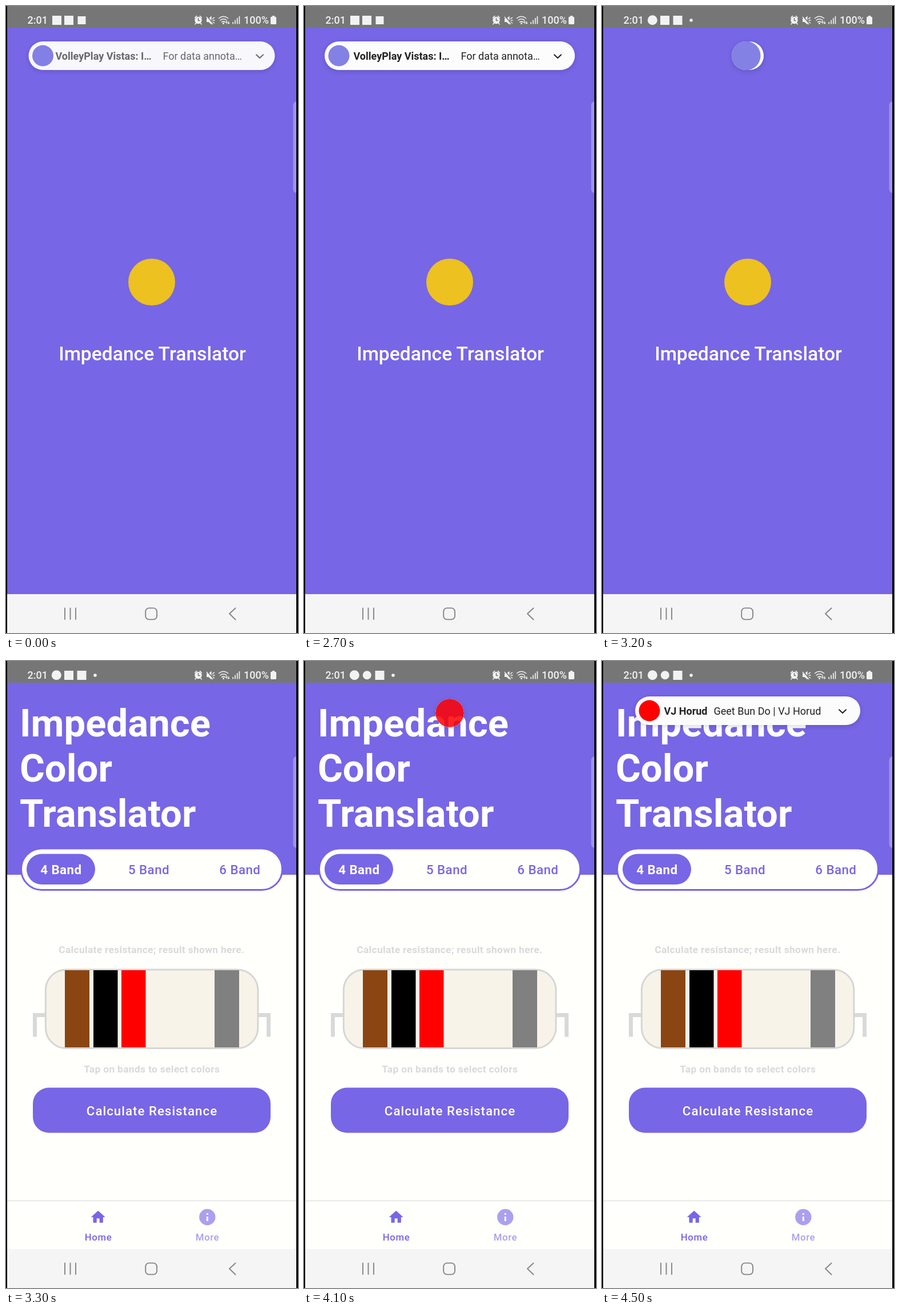
Animation of 511 by 1097 pixels, one loop 5300 ms. Source, as an HTML page:

```html
<!DOCTYPE html>
<html lang="en">
<head>
<meta charset="utf-8">
<title>Resistor bands</title>
<style>
  html, body { margin: 0; width: 100%; height: 100%; overflow: hidden; background: #000; }
  svg { display: block; width: 100%; height: 100%; font-family: Roboto, "Noto Sans", sans-serif; }
  .purple { fill: #7766e6; }
  .white { fill: #fff; }
  .line { fill: none; stroke-linecap: round; stroke-linejoin: round; }
  .mid { text-anchor: middle; }
  .medium { font-weight: 500; }
  .bold { font-weight: 700; }
  .title { font-size: 67px; font-weight: 700; }
  .tab { font-size: 22.3px; letter-spacing: .45px; }
  .hint { font-size: 17.4px; letter-spacing: .32px; font-weight: 700; fill: #d9d9d9; }
  .nav { font-size: 16.8px; letter-spacing: .6px; font-weight: 500; }
  .status { font-size: 18px; font-weight: 500; fill: #f2f2f2; }
  .icons { fill: #f2f2f2; }
  .back { fill: #fcfcfd; filter: drop-shadow(0 2px 4px rgba(0, 0, 0, .16)); }
  .label { font-size: 18px; fill: #222; }
  .chevron { stroke: #222; stroke-width: 2; }
</style>
</head>
<body>
<svg viewBox="0 0 511 1097" preserveAspectRatio="none">
  <rect width="511" height="1097"/>

  <g id="splash">
    <rect class="purple" x="2" y="38" width="506" height="992"/>
    <circle cx="255" cy="483" r="41" fill="#edc11f"/>
    <text class="white mid medium" x="256" y="620" font-size="33.6">Impedance Translator</text>
  </g>

  <g id="home">
    <rect x="2" y="38" width="506" height="992" fill="#fffffc"/>
    <rect class="purple" x="2" y="38" width="506" height="336"/>
    <g class="white title">
      <text x="24" y="132">Impedance</text>
      <text x="24" y="211">Color</text>
      <text x="24" y="290">Translator</text>
    </g>

    <rect x="26.5" y="328" width="457" height="72.5" rx="36" fill="#fffffc" stroke="#7766e6" stroke-width="3"/>
    <rect class="purple" x="36" y="337.5" width="120" height="53.5" rx="26.7"/>
    <g class="tab mid purple">
      <text class="white bold" x="96.3" y="373">4 Band</text>
      <text class="medium" x="250" y="373">5 Band</text>
      <text class="medium" x="409.3" y="373">6 Band</text>
    </g>

    <text class="hint mid" x="254.8" y="511">Calculate resistance; result shown here.</text>
    <path d="M70 619.5H50.5V657.5M440 619.5H459.5V657.5" fill="none" stroke="#d9d9d9" stroke-width="7"/>
    <rect x="69.3" y="540" width="371.6" height="137.6" rx="36" fill="#f7f3e9" stroke="#d6d6d6" stroke-width="3"/>
    <rect x="103" y="541" width="43" height="135" fill="#8b4513"/>
    <rect x="153" y="541" width="42.5" height="135"/>
    <rect x="202" y="541" width="42.5" height="135" fill="#f00"/>
    <rect x="365" y="541" width="43" height="135" fill="#808080"/>
    <text class="hint mid" x="255.2" y="719.5">Tap on bands to select colors</text>

    <rect class="purple" x="47" y="746.5" width="416" height="79" rx="28"/>
    <text class="white mid medium" x="255.5" y="795" font-size="22.3" letter-spacing="1">Calculate Resistance</text>

    <rect x="2" y="944" width="506" height="1" fill="#d8d8d8"/>
    <path class="purple" transform="translate(146.3 958) scale(1.24)" d="M10 20v-6h4v6h5v-8h3L12 3 2 12h3v8z"/>
    <circle cx="352.3" cy="973" r="14.2" fill="#aba0ef"/>
    <path class="white" d="M350.8 972h3v8h-3zM350.8 966h3v3h-3z"/>
    <g class="nav mid">
      <text class="purple" x="161.5" y="1014">Home</text>
      <text x="352.4" y="1014" fill="#aba0ef">More</text>
    </g>
  </g>

  <rect x="2" width="506" height="38" fill="#767676"/>
  <g class="status">
    <text x="37.5" y="31">2:01</text>
    <text x="416" y="31">100%</text>
  </g>
  <g class="icons" id="before">
    <rect x="81" y="17" width="16" height="16"/>
    <rect x="102" y="17" width="16" height="16"/>
    <rect x="125.5" y="18" width="14" height="14"/>
  </g>
  <g class="icons" id="after">
    <circle cx="88.3" cy="24.8" r="8.5"/>
    <rect id="chat" x="102" y="17" width="16" height="16"/>
    <circle id="video" cx="110.3" cy="24.8" r="7.5"/>
    <rect x="124.5" y="17" width="16" height="16"/>
    <circle cx="156" cy="25" r="2.8"/>
  </g>
  <g class="icons">
    <circle cx="336.5" cy="25" r="6.2"/>
    <path class="line" d="M330.6 20.5l3-2.8M342.4 20.5l-3-2.8M332.5 30l-1.5 1.8M340.5 30l1.5 1.8" stroke="#f2f2f2" stroke-width="1.7"/>
    <path class="line" d="M336.5 21.5V25.5H339" stroke="#767676" stroke-width="1.5"/>
    <path d="M351 22h3.5l5-4.5v15l-5-4.5H351z"/>
    <path class="line" d="M361.5 22.2l3-2M362 25h3M361.5 27.8l3 2" stroke="#f2f2f2" stroke-width="1.5"/>
    <path d="M351.5 18l11.5 13.5" stroke="#767676" stroke-width="2.6"/>
    <path d="M350.8 19l11 13" stroke="#f2f2f2" stroke-width="1.4"/>
    <path class="line" d="M372.5 21.5q8-6.4 16 0M375 25q5.5-4.4 11 0M377.7 28.2q2.8-2.2 5.6 0" stroke="#f2f2f2" stroke-width="1.6"/>
    <circle cx="380.5" cy="30.6" r="1.5"/>
    <path class="line" d="M386 31V27.3M384.6 28.4l1.4-1.5 1.4 1.5M389.6 27V31M388.2 29.6l1.4 1.5 1.4-1.5" stroke="#f2f2f2" stroke-width="1.1"/>
    <path d="M397.2 31.5V28M401 31.5V24.5M404.8 31.5V21M408.4 31.5V18" stroke="#f2f2f2" stroke-width="1.7"/>
    <path d="M466 17h4v1.8h1.4q1.6 0 1.6 1.6v10q0 1.6-1.6 1.6h-6.8q-1.6 0-1.6-1.6v-10q0-1.6 1.6-1.6h1.4z"/>
  </g>

  <path d="M508 167q-5.5 1-5.5 7V320q0 6 5.5 7z" fill="#d8d2fb" opacity=".42"/>
  <rect x="2" y="1029" width="506" height="68" fill="#f5f5f5"/>
  <g class="line" stroke="#858585" stroke-width="1.9">
    <path d="M103 1053.5V1073M112.5 1053.5V1073M122 1053.5V1073M401.5 1053.5L391 1063.3l10.5 10.2"/>
    <rect x="244.2" y="1053.4" width="19.8" height="20" rx="6"/>
  </g>

  <g id="message">
    <rect class="back"/>
    <clipPath id="messageClip"><rect/></clipPath>
    <g clip-path="url(#messageClip)">
      <g class="label">
        <text class="bold" x="86.5" y="94">VolleyPlay Vistas: I…</text>
        <text x="274.5" y="94">For data annota…</text>
        <path class="line chevron" d="M438 85.2l6 5.8 6-5.8"/>
      </g>
      <circle class="badge" fill="#8381e4"/>
    </g>
  </g>

  <g id="upload">
    <rect class="back"/>
    <clipPath id="uploadClip"><rect/></clipPath>
    <g clip-path="url(#uploadClip)">
      <g class="label">
        <text class="bold" x="108.5" y="94">VJ Horud</text>
        <text x="195.5" y="94">Geet Bun Do | VJ Horud</text>
        <path class="line chevron" d="M415 85.2l6 5.8 6-5.8"/>
      </g>
      <circle class="badge" fill="#f00"/>
    </g>
  </g>
</svg>
<script>
  const LOOP = 5300, TICK = 100;
  const byId = id => document.getElementById(id);
  const show = (id, on) => byId(id).setAttribute("display", on ? "inline" : "none");
  const set = (el, attrs) => {
    for (const name in attrs) el.setAttribute(name, attrs[name]);
  };

  // time, width, centre y, height, badge radius, label opacity, pill opacity
  const tracks = {
    message: [
      [0, 431, 87, 50, 18.5, .68, .97],
      [100, 438, 87, 50, 18.5, 1, 1],
      [2800, 438, 87, 50, 18.5, 1, 1],
      [2900, 418, 87, 50, 18.8, .5, 1],
      [3000, 290, 87, 50, 20.5, 0, 1],
      [3200, 56, 87, 50, 25.5, 0, 1]
    ],
    upload: [
      [3900, 30, 67, 30, 15, 0, .35],
      [4000, 44, 80, 44, 22, 0, .65],
      [4100, 50, 91, 50, 25, 0, .85],
      [4200, 150, 89, 50, 23, 0, 1],
      [4300, 310, 87, 50, 20, .2, 1],
      [4400, 396, 87, 50, 18.5, .8, 1],
      [4500, 394, 87, 50, 18.5, 1, 1],
      [LOOP, 394, 87, 50, 18.5, 1, 1]
    ]
  };

  function sample(keys, t) {
    const i = keys.findIndex(k => k[0] >= t);
    if (i <= 0) return keys[0];
    const a = keys[i - 1], b = keys[i], p = (t - a[0]) / (b[0] - a[0]);
    return a.map((v, n) => v + (b[n] - v) * p);
  }

  function drawPill(id, t) {
    const keys = tracks[id];
    const on = t >= keys[0][0] && t <= keys[keys.length - 1][0];
    show(id, on);
    if (!on) return;
    const [, w, cy, h, r, label, alpha] = sample(keys, t);
    const x = 255 - w / 2, el = byId(id);
    const box = { x, y: cy - h / 2, width: w, height: h, rx: h / 2 };
    set(el, { opacity: alpha });
    el.querySelectorAll("rect").forEach(rect => set(rect, box));
    set(el.querySelector(".label"), { opacity: label });
    set(el.querySelector(".badge"), { cx: x + Math.min(25, w / 2), cy, r });
  }

  function draw(ms) {
    const t = Math.floor((ms % LOOP) / TICK) * TICK;
    show("splash", t < 3300);
    show("home", t >= 3300);
    show("before", t < 3000);
    show("after", t >= 3000);
    show("chat", t < 3600);
    show("video", t >= 3600);
    drawPill("message", t);
    drawPill("upload", t);
  }

  const start = performance.now();
  function frame() {
    draw(performance.now() - start);
    requestAnimationFrame(frame);
  }
  frame();
</script>
</body>
</html>
```
